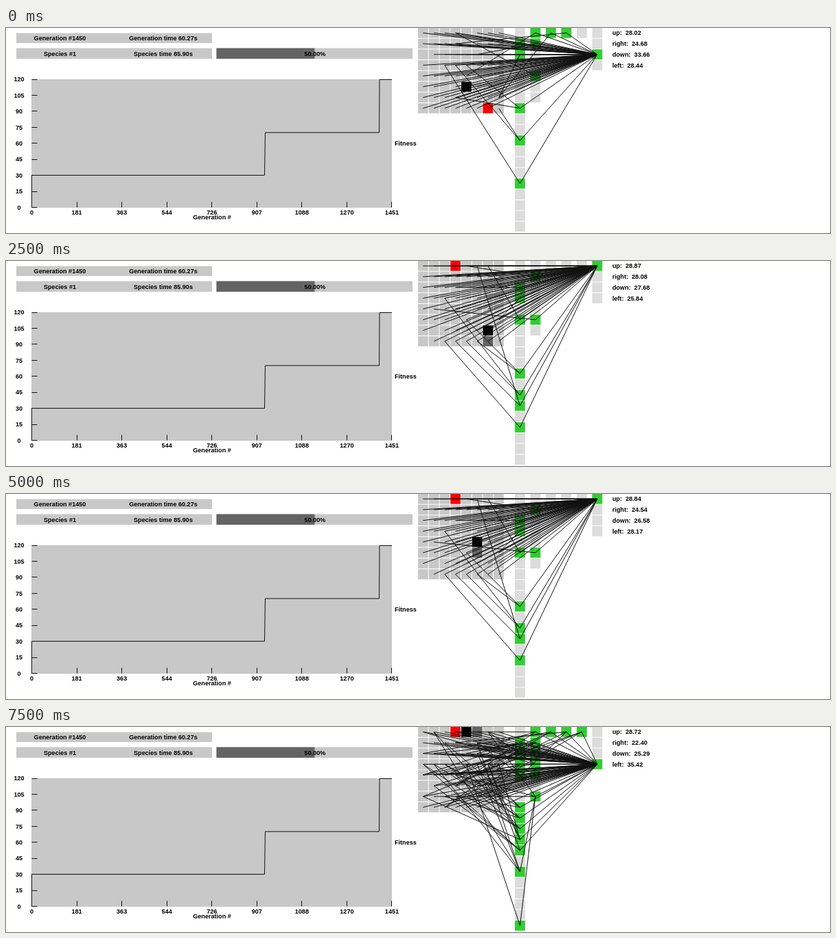
Recreate the animation shown at these times as an HTML page with a canvas. Size 1200 by 300 pixels, loop 8000 ms.

```html
<!DOCTYPE html>
<html lang="en">
<head>
<meta charset="utf-8">
<title>Neural network trainer</title>
<style>
html, body { margin: 0; width: 100%; height: 100%; overflow: hidden; background: #fff; }
canvas { display: block; width: 1200px; height: 300px; }
</style>
</head>
<body>
<canvas id="stage" width="1200" height="300"></canvas>
<script>
const ctx = document.getElementById('stage').getContext('2d');
const STEP_MS = 500, PITCH = 15.75, CELL = 14.75;
const GREY = '#c8c8c8', PALE = '#dcdcdc', DARK = '#646464', GREEN = '#32cd32';
const GRID = 8; // input columns 0-7, hidden columns 8-12, then the outputs
const OUTPUT = 13, DEEP_ROW = 7;
const LAYER_SIZES = [19, 7, 1, 1, 1, 4];
const MOVES = 'DDDRRUUUDLUUUUUL';
const EAT_STEP = 4;

// Key readings of up, right, down and left; steps between are interpolated
const READINGS = [
  { step: 0, values: [28.02, 24.68, 33.66, 28.44] },
  { step: 2, values: [29.82, 33.86, 36.82, 27.47] },
  { step: 4, values: [25.25, 31.74, 27.93, 23.32] },
  { step: 7, values: [33.75, 23.13, 27.18, 30.87] },
  { step: 9, values: [28.86, 23.73, 28.39, 29.43] },
  { step: 12, values: [28.80, 26.16, 22.95, 25.64] },
  { step: 15, values: [28.72, 22.40, 25.29, 35.42] }
];

// active: lit rows per hidden layer; anchor: input feeding the lowest node;
// fan: random inputs per node; reach: last row wired straight to the output
const NETS = {
  U: { dx: 0, dy: -1, out: 0, fan: 1, anchor: [2, 7], reach: 18,
    active: [[2, 3, 5, 10, 12, 13, 15], [1, 5]] },
  R: { dx: 1, dy: 0, out: 1, fan: 2, anchor: [0, 3], reach: 18,
    active: [[0, 4, 6, 9, 16, 17]] },
  D: { dx: 0, dy: 1, out: 2, fan: 1, anchor: [2, 3], reach: 18,
    active: [[1, 2, 7, 10, 14], [0, 1, 4], [0], [0]] },
  L: { dx: -1, dy: 0, out: 3, fan: 3, anchor: [4, 3], reach: 11,
    active: [[1, 2, 3, 4, 7, 8, 9, 10, 11, 13, 18], [0, 1, 2, 3, 4, 6], [0], [0], [0]] }
};

function makeRandom(seed) {
  return () => (seed = (seed * 16807) % 2147483647) / 2147483647;
}

function nodeX(col) {
  return col < GRID ? 607.4 + col * PITCH : 748.5 + (col - GRID) * 22.5;
}

function nodeY(row) {
  return 7.2 + row * PITCH;
}

function rect(x, y, w, h, color) {
  ctx.fillStyle = color;
  ctx.fillRect(x, y, w, h);
}

function cell(col, row, color) {
  rect(nodeX(col) - CELL / 2, nodeY(row) - CELL / 2, CELL, CELL, color);
}

function text(string, x, y, align = 'center') {
  ctx.fillStyle = '#000';
  ctx.textAlign = align;
  ctx.fillText(string, x, y + 3.2);
}

function polyline(...points) {
  ctx.beginPath();
  points.forEach(([x, y]) => ctx.lineTo(x, y));
  ctx.stroke();
}

function wire(c1, r1, c2, r2) {
  ctx.moveTo(nodeX(c1), nodeY(r1));
  ctx.lineTo(nodeX(c2), nodeY(r2));
}

function drawPanels() {
  rect(15, 7.5, 285, 14.5, GREY);
  rect(15, 29.5, 285, 15.5, GREY);
  rect(306.5, 29.5, 285.5, 15.5, GREY);
  rect(306.5, 29.5, 143, 15.5, DARK);
  text('Generation #1450', 78.5, 15);
  text('Generation time 60.27s', 229, 15);
  text('Species #1', 78.5, 37.5);
  text('Species time 85.90s', 229, 37.5);
  text('50.00%', 450, 37.5);
}

function drawChart() {
  const left = 37.5, right = 562, top = 75, bottom = 262.5;
  const fitnessY = fitness => bottom - (bottom - top) * fitness / 120;
  rect(37, top, 525, 188, GREY);
  ctx.strokeStyle = '#111';
  ctx.lineWidth = 1;
  for (let i = 0; i <= 8; i++) {
    const x = left + 65.56 * i, y = fitnessY(15 * i);
    const tickX = Math.floor(x) + 0.5, tickY = Math.floor(y) + 0.5;
    polyline([left, tickY], [left + 8, tickY]);
    polyline([tickX, bottom], [tickX, bottom - 8]);
    text(15 * i, 19, y);
    text(Math.round(1451 * i / 8), x, 270);
  }
  polyline([left, bottom], [left, 215.5], [376.5, 215.5], [377.5, 153], [543.5, 153],
    [544, 75.5], [right, 75.5]);
  text('Generation #', 300, 277);
  text('Fitness', 566, 168.5, 'left');
}

function drawWires(net) {
  const random = makeRandom(41 + net.out * 1009);
  const anyInput = () => Math.floor(random() * GRID);
  ctx.strokeStyle = '#111';
  ctx.lineWidth = 1;
  ctx.beginPath();
  for (let row = 0; row < GRID; row++) {
    for (let col = 0; col < GRID; col++) {
      if (random() < 0.88) wire(col, row, OUTPUT, net.out);
    }
  }
  net.active.forEach((rows, layer) => rows.forEach((row, i) => {
    const col = GRID + layer, fromBottom = rows.length - 1 - i;
    const deep = row >= DEEP_ROW;
    if (deep) wire((net.anchor[0] + fromBottom) % GRID, net.anchor[1], col, row);
    if (!deep || fromBottom > 0) {
      for (let n = 0; n < net.fan; n++) wire(anyInput(), anyInput(), col, row);
    }
    if (row <= net.reach) wire(col, row, OUTPUT, net.out);
    else wire(col, row, GRID + 1, net.active[1].at(-1));
  }));
  ctx.stroke();
}

function readingsAt(step, winner) {
  const next = Math.max(1, READINGS.findIndex(key => key.step >= step));
  const a = READINGS[next - 1], b = READINGS[next];
  const t = (step - a.step) / (b.step - a.step);
  const values = a.values.map((value, i) => value + (b.values[i] - value) * t);
  // The chosen direction always carries the highest reading.
  const best = values.indexOf(Math.max(...values));
  [values[best], values[winner]] = [values[winner], values[best]];
  return values;
}

function drawNetwork(step) {
  let head = [4, 4], body;
  for (const move of MOVES.slice(0, step + 1)) {
    body = head;
    head = [head[0] + NETS[move].dx, head[1] + NETS[move].dy];
  }
  const net = NETS[MOVES[step]];
  const eaten = step >= EAT_STEP;

  for (let col = 0; col < GRID; col++) {
    for (let row = 0; row < GRID; row++) cell(col, row, GREY);
  }
  LAYER_SIZES.forEach((size, layer) => {
    for (let row = 0; row < size; row++) cell(GRID + layer, row, PALE);
  });
  net.active.forEach((rows, layer) => rows.forEach(row => cell(GRID + layer, row, GREEN)));
  cell(OUTPUT, net.out, GREEN);
  cell(...(eaten ? [3, 0] : [6, 7]), '#f00');
  if (eaten) cell(...body, DARK);
  cell(...head, '#000');
  drawWires(net);

  const values = readingsAt(step, net.out);
  ['up', 'right', 'down', 'left'].forEach((name, i) =>
    text(`${name}:  ${values[i].toFixed(2)}`, 883, nodeY(i), 'left'));
}

let shownStep = -1;
function frame(now) {
  const step = Math.floor(now / STEP_MS) % MOVES.length;
  if (step !== shownStep) {
    shownStep = step;
    rect(0, 0, 1200, 300, '#fff');
    ctx.font = 'bold 9.1px "Liberation Sans", Arial, sans-serif';
    drawPanels();
    drawChart();
    drawNetwork(step);
  }
  requestAnimationFrame(frame);
}
frame(performance.now());
</script>
</body>
</html>
```
